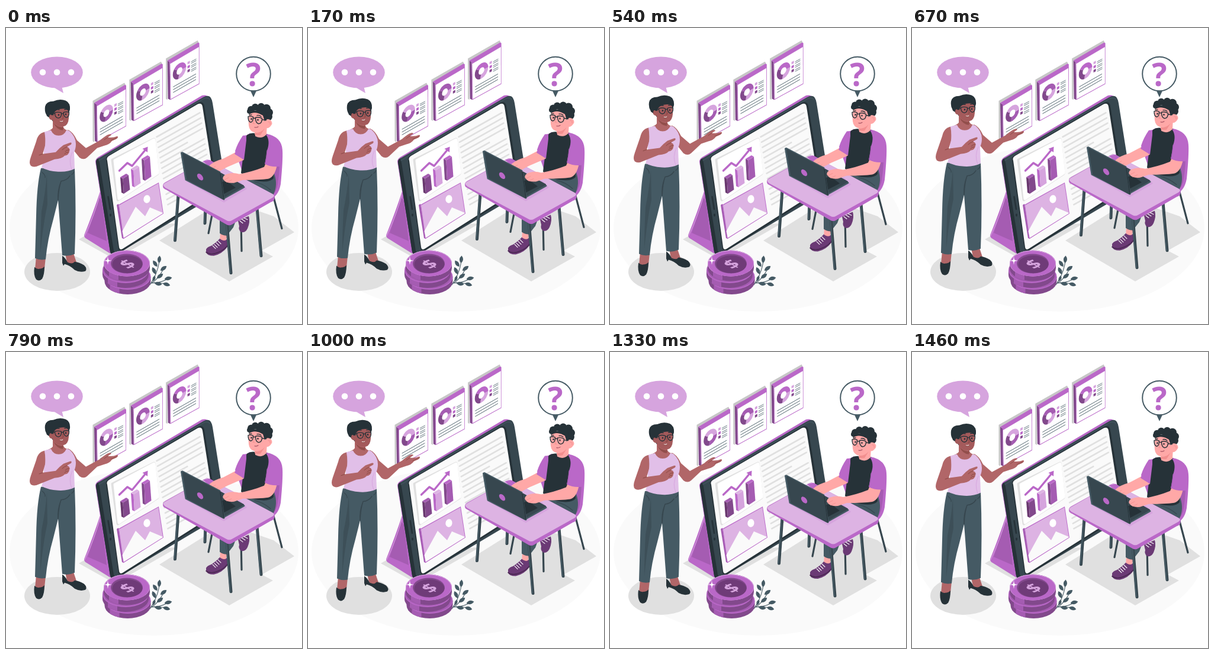
These frames come from a looping animation (500x500 px, 1500 ms). An HTML page:

```html
<!DOCTYPE html>
<html lang="en">
<head>
<meta charset="utf-8">
<title>Consulting scene</title>
<style>
html, body { margin: 0; width: 100%; height: 100%; overflow: hidden; background: #fff; }
svg { display: block; width: 100vw; height: 100vh; }
</style>
</head>
<body>
<svg id="stage" viewBox="0 0 500 500"></svg>
<script>
const INK = '#263238', DARK = '#37474f', SLATE = '#455a64', GREY = '#e0e0e0', PAPER = '#fafafa';
const PURPLE = '#ba68c8', LIGHT = '#d6a4de', PALE = '#ddb3e3', DEEP = '#82498c', MID = '#a55cb2';
const BROWN = '#b16668', FACE = '#a45a5b', BROWN_DARK = '#85443f', PINK = '#ffa8a7', PINK_DARK = '#f28f8f';

const shape = (d, fill, extra = '') => `<path d="${d}" fill="${fill}" ${extra}/>`;
const poly = (pts, fill, extra = '') => `<polygon points="${pts}" fill="${fill}" ${extra}/>`;
const soft = (pts, fill, w = 4) =>
  poly(pts, fill, `stroke="${fill}" stroke-width="${w}" stroke-linejoin="round"`);
const line = (d, color, w = 1) =>
  `<path d="${d}" fill="none" stroke="${color}" stroke-width="${w}" stroke-linecap="round" stroke-linejoin="round"/>`;
const oval = (x, y, rx, ry, fill, turn = 0, extra = '') =>
  `<ellipse cx="${x}" cy="${y}" rx="${rx}" ry="${ry}" fill="${fill}" transform="rotate(${turn} ${x} ${y})" ${extra}/>`;
const group = (content, attrs) => `<g ${attrs}>${content}</g>`;
const repeat = (n, fn) => Array.from({ length: n }, (_, i) => fn(i)).join('');
const sign = (char, size, color, attrs) =>
  `<text text-anchor="middle" font-family="'Open Sans', sans-serif" font-weight="700" font-size="${size}" fill="${color}" ${attrs}>${char}</text>`;

function ground() {
  return oval(250, 338, 244, 141, PAPER)
    + oval(86.5, 412, 55.5, 32, GREY)
    + poly('123,357 160,336 290,330 184,391', GREY)
    + poly('259,359 377,428 451,386 432,376 487,345 452,318 400,300 350,302', GREY);
}

function sheet(i) {
  const ring = (color, from, size) =>
    `<circle r="8.8" fill="none" stroke="${color}" stroke-width="7" pathLength="100" stroke-dasharray="${size} ${100 - size}" stroke-dashoffset="${-from}"/>`;
  const [right, left, top] = [[MID, DEEP, LIGHT], [LIGHT, DEEP, MID], [LIGHT, DEEP, PURPLE]][i];
  const donut = ring(right, 0, 28) + ring(left, 28, 32) + ring(top, 60, 40);
  const keys = repeat(3, k => {
    const y = 129 + k * 6.8;
    return poly(`183,${y} 187,${y - 2.2} 187,${y + 2} 183,${y + 4.2}`, [LIGHT, PURPLE, DEEP][k])
      + line(`M189.5 ${y - .5}l8-4.4M189.5 ${y + 2.2}l8-4.4`, SLATE, .8);
  });
  const rows = repeat(3, k => line(`M159 ${171 + k * 4.7}l38-21.7`, SLATE, .9));
  return group(
    poly('146.5,123 200,92.5 202,96 149,127 149,193 146.5,191', '#c7c7c7')
    + poly('149,126.5 153,129 154,193 150,191', DEEP)
    + poly('149,126.5 201,96 203,97 203,166 154,193 153,129', PURPLE)
    + poly('153.8,132 202.2,103.5 202.3,165.3 154.7,191.5', '#fff')
    + group(donut, 'transform="matrix(.92 -.53 0 1.05 169.5 144)"') + keys + rows,
    `transform="translate(${i * 61.8} ${i * -35.8})"`);
}

function bar(x, y, h, side, face, top) {
  return poly(`${x},${y} ${x + 4.5},${y + 2.5} ${x + 6},${y + h} ${x + 2},${y + h - 2}`, side)
    + poly(`${x + 4.5},${y + 2.5} ${x + 14},${y - 3.5} ${x + 16.5},${y + h - 7} ${x + 6},${y + h}`, face)
    + poly(`${x},${y} ${x + 10},${y - 6} ${x + 14},${y - 3.5} ${x + 4.5},${y + 2.5}`, top);
}

function tablet() {
  const rows = repeat(14, k => {
    const w = k === 4 ? 46 : k === 9 ? 40 : 73;
    return line(`M${254.5 + k * 1.45} ${184 + k * 8.8}l${w} ${-w * .56}`, GREY, 2.6);
  });
  const chart = soft('180,223 250,188 256,246 189,290', GREY, 5)
    + soft('184,224 250,189 256,245 191,288', '#fff', 5)
    + line('M191.5 241L205 228L213 233L237 204', PURPLE, 3.4)
    + poly('230.5,204 239.5,200.5 239,210', PURPLE)
    + bar(193, 252, 28, '#69386f', DEEP, MID)
    + bar(211, 238, 31, PURPLE, LIGHT, PALE)
    + bar(229, 221, 37, DEEP, MID, PURPLE);
  const photo = poly('187,299 190,297 199,356 196,355', MID)
    + poly('190,298.5 258,261 266,313.5 198,356.5', PURPLE)
    + poly('191,299.5 257.3,262.5 265,313 198.8,354.5', PALE)
    + poly('196.5,343 219,302 235,318 243,303 264.4,312 265,313 198.8,354.5', PAPER)
    + oval(238, 289, 5.6, 6.8, '#fff', 10);
  return shape('M159 276Q148 310 132 350Q132 354 136 356L176 381L170 290Z', PURPLE)
    + poly('158,287 162,292 170,360 138,346', MID)
    + line('M159 280Q150 315 133 351', LIGHT, 1)
    + shape('M151 226Q151 221 156 218L331 114Q339 112 344 118L180 384L175 379Z', PURPLE)
    + shape('M152 227Q152 221 158 219L333 117Q342 112 346 118Q348 121 349 127L371 266Q372 272 367 275L187 382Q179 386 176 378Z', DARK)
    + shape('M152 227Q152 222 155 221Q157 222 158 228L182 376Q184 382 188 381Q178 386 176 378Z', INK)
    + line('M157 224L334 119.5Q341 116 344 121', SLATE, 1)
    + line('M172.5 285L176 306', INK, 2.5) + oval(176.5, 316, 1.5, 2.4, INK)
    + shape('M169 224Q168 218 173 215L325 126Q333 123 335 131L357 268Q358 274 353 277L198 376Q192 379 190 373Z', INK)
    + shape('M171 224Q169 219 174 216L324 128.5Q331 126 332 133L353 267Q354 273 350 276L197 373Q192 376 191 370Z', PAPER)
    + rows + chart + photo;
}

function coins() {
  const coin = (x, y) => shape(`M${x - 39} ${y}v8a39 22 0 0 0 78 0v-8Z`, DEEP)
    + shape(`M${x - 30} ${y + 14}v8q8 5 16 6.5v-8Z`, MID)
    + oval(x, y, 39, 22, PURPLE) + oval(x, y - .8, 38, 21, MID);
  return coin(205.5, 420) + coin(202, 409) + coin(204, 397.5)
    + oval(204, 397.5, 39, 22, LIGHT) + oval(204, 398, 38.2, 21.4, PURPLE)
    + oval(204, 398, 27, 16.5, DEEP) + oval(205, 399.2, 25.5, 15, '#6f3b78')
    + sign('$', 29, LIGHT, 'y="10.5" transform="matrix(.87 -.5 .87 .5 205 398.5)"')
    + poly('172,386 173,392 179,393 173,394 172,400 171,394 165,393 171,392', '#fff')
    + oval(172, 393, 2.2, 2.2, '#fff', 0, 'opacity=".7"');
}

function plant() {
  const leaf = (x, y, turn, r = 6.5) => shape(`M${-r} 0Q0 ${-r * .95} ${r} 0Q0 ${r * .95} ${-r} 0Z`, SLATE,
    `transform="translate(${x} ${y}) rotate(${turn})"`);
  return line('M243 434Q256 415 259 394M244 432Q257 425 266 407M245 431Q262 431 274 423M250 430L272 432', SLATE, 1.1)
    + leaf(259, 391, -85) + leaf(252, 398, 55) + leaf(266, 406, -35) + leaf(250, 410, 65)
    + leaf(260, 419, -35) + leaf(250, 423, -70, 5) + leaf(274, 423, -10) + leaf(257, 432, 10) + leaf(271, 433, 15);
}

function bubbles() {
  return oval(86, 75, 43.8, 26.5, LIGHT) + poly('79,99 85,103 97,110 94,98', LIGHT)
    + repeat(3, i => oval(62 + i * 24, 74.7, 5.3, 5.3, '#fff'))
    + poly('412,104 418,117 424,104', SLATE)
    + `<circle cx="418" cy="77.5" r="28.8" fill="#fff" stroke="${SLATE}" stroke-width="2"/>`
    + sign('?', 53, PURPLE, 'x="418" y="97.7"');
}

function woman() {
  const legs = shape('M51 386L49 408Q57 415 65 407L67 388Z', BROWN)
    + shape('M100 381L103 396Q112 402 119 396L114 381Z', BROWN)
    + shape('M48 404Q53 408 56 407Q62 407 65 403Q65 417 61 424Q56 429 51 425Q46 418 48 404Z', INK)
    + shape('M95 385Q100 388 104 396Q112 400 116 395Q124 396 132 401Q138 407 134 411Q125 414 116 409Q108 401 99 399L97 402L95 397Z', INK)
    + shape('M59 237Q52 265 51 318Q50 355 49 389Q57 393 67 391Q70 358 80 323L88 291L95 384Q105 387 116 382Q119 310 116 236Z', SLATE)
    + line('M88 291Q89 270 93 259Q103 258 108 250M92 262Q87 275 88 291', DARK, 1.5)
    + shape('M69 248Q67 276 60 310Q58 350 58 380Q63 330 70 298Z', DARK, 'opacity=".55"')
    + line('M61 244Q67 249 66 253M111 248Q114 246 115 243', DARK, 1.2);
  const head = shape('M79 152L79 169Q76 173 66 176L70 192L110 192L108 174Q99 173 97 168L97 160Z', BROWN)
    + shape('M80 160Q86 168 97 168L96 173Q85 172 80 160Z', BROWN_DARK, 'opacity=".7"')
    + shape('M76 153Q64 148 66 133Q68 124 80 124Q91 119 101 123Q109 127 108 138L106 144Q94 134 83 140L79 158Z', INK)
    + shape('M78 142Q83 135 93 136Q106 133 106 146Q107 160 101 165Q95 168 87 165Q81 162 79 156Q72 155 72 149Q73 144 78 148Z', FACE)
    + shape('M69 149Q64 130 79 127Q94 119 105 128Q107 133 106 138Q97 135 87 138Q81 141 80 148L76 146Q73 146 73 151Z', INK)
    + group('<path d="M82.5 143.5Q88 141.5 93.5 143.5Q94 152 88.5 152.5Q82.5 152 82.5 143.5ZM97 143Q102 141 106.5 142.5Q107 151 102 151.5Q97.5 151 97 143ZM93.5 145.5Q95 144.5 97 145M75 143L82.5 145" fill="none"/>', `stroke="${INK}" stroke-width="1.3"`)
    + oval(89, 147, 1.2, 1.5, INK) + oval(101, 146, 1.2, 1.5, INK)
    + line('M83.5 139.5Q86 137.5 90 138.5M99 138Q102 137 104.5 138.5', INK, 1.4)
    + line('M95.5 147L97 153L94.5 153.5', BROWN_DARK, 1)
    + line('M91.5 158Q94 159 96 157.5', '#fff', 1.2) + line('M91 159Q94 160.3 97 158', BROWN_DARK, .8);
  const farArm = shape('M104 172Q113 175 120 190L135 203L159 190Q163 186 171 181Q177 178 178 181L172 185Q181 186 188 183Q191 185 186 188L179 191Q175 197 166 199L154 203L137 219Q131 224 124 219L112 204Z', BROWN)
    + line('M172 185L166 189M187 186L177 190', BROWN_DARK, .8);
  const top = shape('M64 176Q70 174 76 173Q80 182 89 182Q98 182 102 173L107 174Q118 184 118 196Q118 204 115 210L116 238Q104 244 88 243Q71 242 60 236Q64 225 64 211Q60 190 64 176Z', '#e1bfe8')
    + line('M112 210Q105 225 111 239', LIGHT, .9);
  const nearArm = shape('M65 176Q54 178 51 192L42 218Q38 229 42 233Q47 237 57 232L82 222Q95 221 99 216Q106 215 107 209Q109 203 103 201L110 197Q112 193 108 194L97 198Q90 203 84 210L62 213L66 199Q67 186 65 176Z', BROWN)
    + line('M103 201Q98 203 95 206M107 206Q102 206 100 209M105 210Q101 210 99 213M62 213L56 215', BROWN_DARK, .9);
  return legs + farArm + head + top + nearArm;
}

const tableLeg = (x1, y1, x2, y2) =>
  line(`M${x1} ${y1}L${x2} ${y2}`, DARK, 5) + line(`M${x1 - 1} ${y1}L${x2 - 1} ${y2}`, SLATE, 2);

function man() {
  const chair = line('M452 286L466 339M397 328L398 377M348 316L342 347', DARK, 3.2)
    + shape('M400 182Q391 195 387 208L398 240L444 290Q460 286 464 264Q468 222 467 207Q466 184 440 179Z', PURPLE)
    + shape('M440 182Q461 186 462 208Q463 240 459 264Q457 278 448 284L430 260Z', MID);
  const sneaker = (d, laces) => shape(d, '#6b3a75') + line(laces, '#fff', 1.1);
  const legs = shape('M362 346L361 361L371 362L374 347Z', PINK)
    + shape('M361 322L391 318L384 337L373 351Q366 351 361 347Z', SLATE)
    + sneaker('M338 374Q340 370 347 368Q357 361 361 356Q369 362 373 357Q377 364 374 370Q365 382 351 385Q339 385 338 379Z', 'M349 368l5 5M352 366l5 5M355 363l5 5M358 360l5 5')
    + line('M338 379Q346 385 359 379Q369 375 374 368', '#4a2852', 1.6)
    + sneaker('M392 326L410 318Q413 327 408 339Q404 347 397 345Q392 341 394 335Z', 'M395 326l5 4M398 323l6 4M402 321l6 3');
  const torso = shape('M398 244L453 246Q460 266 451 283L438 285L399 258Z', SLATE)
    + line('M420 260Q435 263 447 274', DARK, 1.2)
    + shape('M412 178Q401 183 393 199L386 213L402 224L409 190Z', PURPLE)
    + shape('M407 181Q413 177 420 178L440 179Q449 187 450 208L452 254Q446 262 425 259Q407 256 397 245L400 221Q404 199 404 187Z', INK);
  const head = shape('M420 170L441 163L440 180Q432 189 421 183Z', PINK)
    + shape('M420 177Q430 178 437 170L430 181Q424 182 420 180Z', PINK_DARK)
    + [[414, 138, 6], [421, 134, 6], [431, 133, 6], [440, 136, 7], [444, 143, 7], [443, 150, 7], [411, 141, 4], [431, 142, 9]]
      .map(([x, y, r]) => oval(x, y, r, r, INK)).join('')
    + shape('M411 146Q419 139 432 145Q437 150 437 158Q441 152 447 156Q452 161 447 166Q443 171 437 169Q430 178 421 177Q411 175 410 165Q409 154 411 146Z', PINK)
    + shape('M410 147Q418 141 428 145L434 148L437 158L442 150L437 140L412 140Z', INK)
    + line('M443 159Q447 158 446 163', PINK_DARK, 1)
    + group('<path d="M409 150Q413 148.5 417.5 150.5Q417.5 159 413.5 159.5Q409 159 409 150ZM421.5 151.5Q427 150 432.5 153Q432.5 162 426.5 162Q421.5 161 421.5 151.5ZM417.5 153Q419.5 152 421.5 153.5M432.5 155L440 156" fill="none"/>', `stroke="${INK}" stroke-width="1.4"`)
    + oval(414.5, 154, 1.2, 1.6, INK) + oval(425.5, 155.5, 1.2, 1.6, INK)
    + line('M411 147.5L415 147M424 148Q428 147 431 150', INK, 1.3)
    + line('M419 156L417 161.5L420 162', PINK_DARK, 1) + line('M420 168Q423 169 426 167', '#9f4b5d', 1.1);
  const table = tableLeg(337, 300, 336, 330) + tableLeg(291, 282, 285.5, 359)
    + tableLeg(424, 304, 431, 385) + tableLeg(373, 328, 380, 414)
    + shape('M265 267Q265 263 269 261L336 224Q340 221 344 224L451 281Q455 284 453 290Q452 293 448 294L382 332Q377 335 372 332L268 272Q265 271 265 267Z', PURPLE)
    + shape('M266 267Q265 264 269 262L336 224Q340 221 344 224L451 281Q455 284 450 287L382 325Q377 328 372 325L269 270Z', PALE);
  const base = poly('333,225 344,223 365,235 346,238', PURPLE)
    + poly('304,259 368,295 407,272 395,260', LIGHT)
    + soft('312,253 368,288 402,269 363,247', SLATE, 3)
    + soft('312,252 368,286 401,267 363,246', DARK, 2)
    + poly('361,262 367,281 388,270 372,258', INK);
  const farArm = shape('M388 210L367 221Q352 225 344 232Q341 237 346 240Q350 246 359 243L374 235L402 223Z', PINK)
    + line('M346 239L354 234M351 243L358 238', PINK_DARK, .8)
    + shape('M406 181Q398 187 393 199L386 213L402 223L406 190Z', PURPLE);
  const nearArm = shape('M439 228L436 235Q416 243 394 247Q380 243 369 249Q364 254 368 257Q371 263 385 262L400 257Q428 257 443 255Q454 252 458 231Z', PINK)
    + line('M368 257L376 253M373 261L381 257', PINK_DARK, .8)
    + shape('M439 180Q452 181 461 191Q468 200 466 214L463 234Q449 236 437 230Q440 217 441 207Q447 191 439 180Z', PURPLE)
    + line('M441 207Q440 218 438 229', MID, 1);
  const lid = soft('296.5,211.5 298,211 361,244 368,289.5 304,256.5', SLATE, 3)
    + soft('299,213 361,245 367,289 306,256', DARK, 2)
    + line('M362 246L368 289', INK, 1.2)
    + oval(328, 252, 3.9, 6.6, PURPLE, -40);
  return chair + legs + torso + head + table + base + farArm + nearArm + lid;
}

const stage = document.getElementById('stage');
stage.innerHTML = ground() + repeat(3, sheet) + tablet() + plant() + coins() + bubbles()
  + group(woman(), 'class="float"') + group(man(), 'class="float"');

const floats = stage.querySelectorAll('.float');
const LOOP = 1500, LIFT = 10, LEAD = 20;

function draw(ms) {
  const p = ((ms + LEAD) % LOOP) / LOOP;
  const rise = LIFT * (1 - Math.abs(1 - 2 * p));
  floats.forEach(g => g.setAttribute('transform', `translate(0 ${-rise.toFixed(3)})`));
}

const start = performance.now();
function tick() {
  draw(performance.now() - start);
  requestAnimationFrame(tick);
}
draw(0);
requestAnimationFrame(tick);
</script>
</body>
</html>
```
